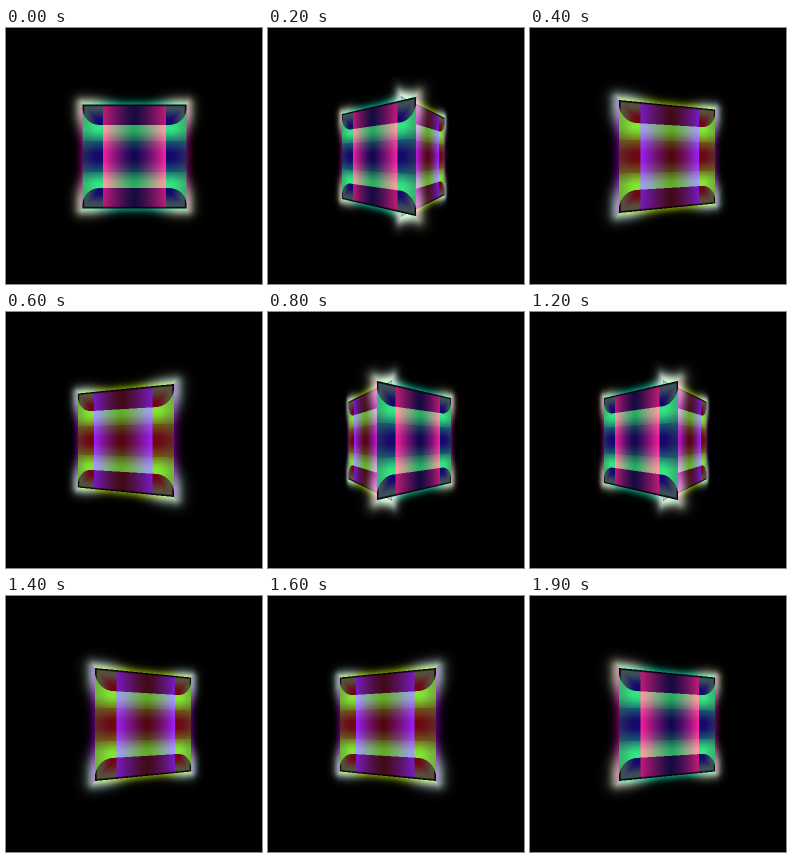
An HTML page with a canvas that plays this animation: 256x256 px, repeating every 2000 ms.

```html
<!DOCTYPE html>
<html lang="en">
<head>
<meta charset="utf-8">
<title>Spinning glow cube</title>
<style>
html, body { margin: 0; width: 100%; height: 100%; overflow: hidden; background: #000; }
canvas { display: block; width: 256px; height: 256px; }
</style>
</head>
<body>
<canvas id="stage" width="256" height="256"></canvas>
<script>
const SIZE = 256, STEP_MS = 100, STEPS = 10, TURN = 18;
const CENTER = 128.5, FOCAL = 172.7, CAMERA = 4.14, FACE_DEPTH = 0.815;
const INNER = 0.61, ROUND = 0.32;

const NAVY = [20, 8, 108], TEAL = [22, 95, 112], GREEN = [50, 230, 128];
const PINK = [238, 25, 95], DUSK = [28, 14, 85], GRAY = [66, 88, 84];
const CREAM = [250, 255, 218], MAGENTA = [165, 0, 125], AQUA = [10, 215, 170];

const ctx = document.getElementById("stage").getContext("2d");
const frames = [];

const mix = (a, b, k) => a.map((x, i) => x + (b[i] - x) * k);
const scale = (a, k) => a.map(x => x * k);
const clamp = x => Math.min(1, Math.max(0, x));
const smooth = (lo, hi, x) => {
  const t = clamp((x - lo) / (hi - lo));
  return t * t * (3 - 2 * t);
};

function stripe(w) {
  return w < 0.3
    ? mix(NAVY, TEAL, smooth(0.03, 0.36, w))
    : mix(TEAL, GREEN, smooth(0.2, 0.55, w));
}

// Rounded bands run along the top and bottom of each face.
function inBand(a, w) {
  if (w < INNER) return false;
  const x = ROUND - (1 - a), y = ROUND - (w - INNER);
  return x < 0 || y < 0 || Math.hypot(x, y) < ROUND;
}

function paint(a, w) {
  const band = inBand(a, w);
  let color = band ? DUSK : stripe(w);
  if (a < INNER) {
    const k = (a / INNER) ** 1.3;
    const base = scale(color, (1 - 0.45 * k) * (0.75 + 0.25 * k));
    const add = k * (band ? 0.75 : 1);
    color = base.map((c, i) => Math.min(255, c + PINK[i] * add));
  } else if (band) {
    color = mix(NAVY, GRAY, 0.9 * smooth(0.68, 0.95, Math.max(a, w)));
  } else {
    color = mix(color, GRAY, 0.35 * smooth(0.7, 1, a));
  }
  return band ? scale(color, 1 - 0.85 * smooth(0.955, 0.985, Math.max(a, w))) : color;
}

// A tinted rim hugs each edge and fades outward into pale light.
function glow(a, w) {
  const dx = Math.max(a - 1, 0), dy = Math.max(w - 1, 0);
  const d = Math.hypot(dx, dy);
  if (d > 0.4) return null;
  const along = dx > dy ? w : a;
  const end = smooth(0.15, 0.9, along);
  const tint = dx > dy ? MAGENTA : AQUA;
  const pale = clamp(end * (0.55 + 4 * d));
  const light = 0.6 + 0.35 * end;
  const reach = 0.085 + 0.04 * end;
  return scale(mix(tint, CREAM, pale), light * Math.exp(-((d / reach) ** 1.5)));
}

function visibleFaces(step) {
  const faces = [];
  for (let k = 0; k < 4; k++) {
    const angle = (90 * k - TURN * step) * Math.PI / 180;
    const cos = Math.cos(angle), sin = Math.sin(angle);
    if (cos > 0.5) faces.push({ cos, sin, swap: k % 2 === 1 });
  }
  return faces.sort((p, q) => p.cos - q.cos);
}

function shade(px, py, faces) {
  const x = (px - CENTER) / FOCAL, y = (py - CENTER) / FOCAL;
  let result = [0, 0, 0];
  for (const { cos, sin, swap } of faces) {
    const t = (CAMERA * cos - FACE_DEPTH) / (cos - x * sin);
    if (t <= 0) continue;
    const a = Math.abs(x * t * cos - (CAMERA - t) * sin);
    const w = Math.abs(y * t);
    const solid = a <= 1 && w <= 1;
    let color = solid ? paint(a, w) : glow(a, w);
    if (!color) continue;
    if (swap) color = [color[2], color[1], color[0]];
    result = solid ? color : result.map((c, i) => c + color[i] * (1 - c / 255));
  }
  return result;
}

function render(step) {
  const image = ctx.createImageData(SIZE, SIZE);
  const data = image.data;
  const faces = visibleFaces(step);
  for (let y = 0; y < SIZE; y++) {
    for (let x = 0; x < SIZE; x++) {
      const at = (y * SIZE + x) * 4;
      data[at + 3] = 255;
      if (x < 56 || x > 200 || y < 48 || y > 208) continue;
      const sum = [0, 0, 0];
      for (let s = 0; s < 4; s++) {
        const color = shade(x + 0.25 + 0.5 * (s & 1), y + 0.25 + 0.5 * (s >> 1), faces);
        for (let i = 0; i < 3; i++) sum[i] += color[i] / 4;
      }
      data.set(sum, at);
    }
  }
  return image;
}

for (let step = 0; step < STEPS; step++) frames.push(render(step));

const start = performance.now();
let shown = -1;
function tick() {
  const step = Math.floor((performance.now() - start) / STEP_MS) % STEPS;
  if (step !== shown) {
    ctx.putImageData(frames[step], 0, 0);
    shown = step;
  }
  requestAnimationFrame(tick);
}
tick();
</script>
</body>
</html>
```
